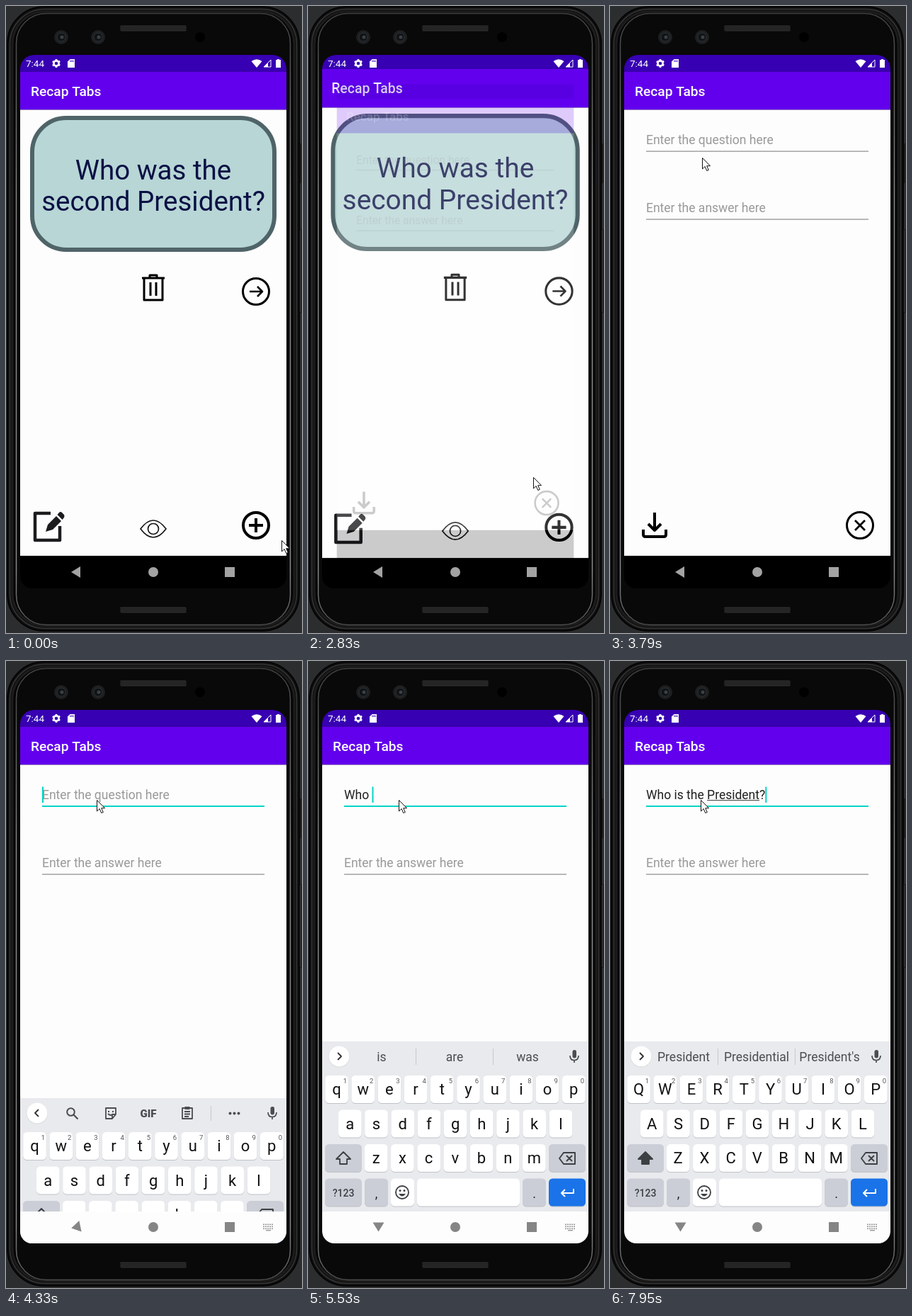
Recreate the animation shown at these times as an HTML page with a canvas. Size 418 px wide and 885 px high, loop 8 s.

```html
<!DOCTYPE html>
<html lang="en">
<head>
<meta charset="utf-8">
<title>Flash card app</title>
<style>
  html, body { margin: 0; width: 100%; height: 100%; overflow: hidden; background: #2c2d2f; }
  canvas { display: block; width: 418px; height: 885px; }
</style>
</head>
<body>
<canvas id="stage" width="418" height="885"></canvas>
<script>
const ctx = document.getElementById('stage').getContext('2d');
const LOOP = 8000;
const TITLE = 'Recap Tabs';
const PAPER = '#fdfdfd', TEAL = '#03d5c5', INK = '#000';

// Each list is held: an entry stays until the time of the next one.
const pointerSteps = [
  [0, 389, 754], [750, 387, 752], [870, 383, 748], [990, 378, 743], [1110, 373, 738],
  [1230, 369, 734], [1350, 366, 732], [1500, 362, 728], [1640, 358, 728], [1780, 357.5, 728],
  [2830, 318, 665], [2950, 275, 597], [3100, 236, 520], [3220, 198, 440], [3370, 171, 362],
  [3520, 154, 295], [3640, 137, 229], [3790, 130, 214], [3910, 129, 199], [4060, 128, 196]
];
// time, scale of leaving page, scale and opacity of entering page
const pageSteps = [
  [0, 1, 1, 0], [2830, 1.01, .89, .2], [2950, 1.03, .95, .66], [3100, 1.045, .99, 1], [3220, 1, 1, 1]
];
// time, keyboard offset, turn of the back arrow in degrees
const keyboardSteps = [[0, 300, 0], [4330, 80, -12], [4450, 0, -48], [4570, 0, -90]];
const typingSteps = [
  [0, '', ''],
  [4820, 'W', 'We|What|Who'],
  [5100, 'Wh', 'What|Who|When'],
  [5250, 'Who', 'Who|Whole|Whose'],
  [5530, 'Who ', 'is|are|was'],
  [5680, 'Who i', 'in|I|is'],
  [5800, 'Who is', 'is|isn\'t|issue'],
  [5940, 'Who is ', 'the|this|your'],
  [6080, 'Who is t', 'to|the|that'],
  [6200, 'Who is th', 'that|the|this'],
  [6320, 'Who is the', 'the|there|they'],
  [6440, 'Who is the ', 'second|first|President']
];
[...'President'].forEach((_, i) => {
  const time = 6690 + i * 120 + (i > 2 ? 30 : 0);
  const words = i < 1 ? 'second|first|President' : i < 3 ? 'Pro|President|Present'
    : 'President|Presidential|President\'s';
  typingSteps.push([time, 'Who is the ' + 'President'.slice(0, i + 1), words]);
});
typingSteps.push([7950, 'Who is the President?', 'President|Presidential|President\'s']);

const at = (steps, t) => steps.filter(step => step[0] <= t).pop();

function rect(x, y, w, h, color) {
  ctx.fillStyle = color;
  ctx.fillRect(x, y, w, h);
}
function rounded(x, y, w, h, r, fill, stroke, width = 1) {
  ctx.beginPath();
  ctx.roundRect(x, y, w, h, r);
  paint(fill, stroke, width);
}
function circle(x, y, r, fill, stroke, width = 1) {
  ctx.beginPath();
  ctx.arc(x, y, r, 0, Math.PI * 2);
  paint(fill, stroke, width);
}
function paint(fill, stroke, width) {
  if (fill) { ctx.fillStyle = fill; ctx.fill(); }
  if (stroke) { ctx.strokeStyle = stroke; ctx.lineWidth = width; ctx.stroke(); }
}
// SVG path drawn relative to a point
function shape(x, y, d, fill, stroke, width = 2) {
  const path = new Path2D(d);
  ctx.save();
  ctx.translate(x, y);
  ctx.lineJoin = 'round';
  if (fill) { ctx.fillStyle = fill; ctx.fill(path); }
  if (stroke) { ctx.strokeStyle = stroke; ctx.lineWidth = width; ctx.stroke(path); }
  ctx.restore();
}
function text(str, x, y, size, color, align = 'left', weight = 400) {
  ctx.font = `${weight} ${size}px Roboto, sans-serif`;
  ctx.textAlign = align;
  ctx.fillStyle = color;
  ctx.fillText(str, x, y);
  return ctx.measureText(str).width;
}

function drawSpeaker(y) {
  rounded(161, y, 94, 9, 2, '#1b1b1b');
  for (let row = 0; row < 4; row++)
    for (let x = 162 + row % 2; x < 254; x += 2) rect(x, y + 1 + row * 2, 1, 1, '#424242');
}
function drawPhone() {
  rect(0, 0, 418, 885, '#2c2d2f');
  rect(413, 194, 4, 56, '#1a1a1a');
  rect(413, 315, 4, 118, '#151515');
  rect(414, 316, 1.5, 116, '#777');
  rounded(2, 1, 412, 881, 52, '#101010', '#050505', 2);
  rounded(5.5, 4.5, 405, 874, 49, null, '#353535', 1.5);
  rounded(9, 8, 398, 867, 46, '#050505', '#1c1c1c', 3);
  const rim = ctx.createLinearGradient(0, 0, 0, 885);
  rim.addColorStop(0, '#3c3c3c');
  rim.addColorStop(.3, '#8a8a8a');
  rim.addColorStop(.9, '#8a8a8a');
  rim.addColorStop(1, '#444');
  rounded(14.5, 10.5, 387, 863, 42, '#090909', rim, 1.5);
  drawSpeaker(27);
  drawSpeaker(848);
  for (const x of [78, 130]) {
    circle(x, 44, 10, '#1d1f21');
    circle(x, 44, 6, '#101315', '#303336');
    circle(x + 1, 44, 2.5, '#3a4046');
  }
  circle(274, 44, 7, '#000');
}

function drawWindow() {
  rect(20, 69, 376, 23.5, '#3700b3');
  rect(20, 92.5, 376, 54, '#6200ee');
  rect(20, 146.5, 376, 629.5, PAPER);
  rect(20, 776, 376, 46, '#000');
  text(TITLE, 35, 126.5, 19.2, '#fff', 'left', 500);
}
function drawCardPage() {
  drawWindow();
  rounded(37, 158, 342, 186, 48, '#b7d6d5', '#4f6468', 6);
  text('Who was the', 208, 244.5, 38.5, '#0a1045', 'center');
  text('second President?', 208, 289, 38.5, '#0a1045', 'center');
  shape(208, 398, 'M-16-14H16M-5-14V-18H5V-14M-13-14V17H13V-14M-4-8V11M4-8V11', null, INK, 3);
  circle(353, 403, 18.5, null, INK, 3);
  shape(353, 403, 'M-9 0H8M2-7L9 0L2 7', null, INK, 2.6);
  shape(59, 735, 'M4-19H-18V19H17V-1', null, '#1c1c1e', 4.5);
  shape(59, 735, 'M-3 7L0-3L12-15L19-8L7 4ZM13.5-17L16-20Q18-22 20-20L23-17Q24-15 23-13L20.5-10Z', '#1c1c1e');
  shape(208, 738, 'M-18 0Q-9-12 0-12Q9-12 18 0Q9 12 0 12Q-9 12-18 0Z', null, '#151515', 1.7);
  circle(208, 738, 7.5, null, '#151515', 1.7);
  circle(353, 733, 18, null, INK, 4);
  shape(353, 733, 'M-10 0H10M0-10V10', null, INK, 4);
}
function drawField(y, hint, value, focused) {
  rect(51, y - (focused ? 1 : .5), 314, focused ? 2 : 1.2, focused ? TEAL : '#8c8c8c');
  if (!value) text(hint, 51, y - 10, 17.5, '#999');
  if (!focused) return;
  const width = text(value, 51, y - 10, 17.5, '#202020');
  // A lone capital in mid-sentence is not yet marked as being composed.
  const word = value.endsWith(' P') ? null : value.match(/[a-z]+(?=\??$)/i);
  if (word) {
    const start = ctx.measureText(value.slice(0, word.index)).width;
    rect(51 + start, y - 8.8, ctx.measureText(word[0]).width, 1, '#333');
  }
  rect(51 + width, y - 27.5, 2, 22.5, TEAL);
}
function drawEntryPage(value, focused) {
  drawWindow();
  drawField(205, 'Enter the question here', value, focused);
  drawField(301, 'Enter the answer here', '', false);
  shape(63, 733, 'M-16 6V13Q-16 16-13 16H13Q16 16 16 13V6M0-18V6M-9-2L0 7L9-2', null, INK, 4);
  circle(353, 733, 18.5, null, INK, 3);
  shape(353, 733, 'M-7-7L7 7M7-7L-7 7', null, INK, 2.8);
}

function drawKey(x, y, w, color = '#fff') {
  rounded(x, y + 1, w, 39, 5.5, '#bfc2c7');
  rounded(x, y, w, 39, 5.5, color);
}
function drawToolbar(words) {
  const gray = '#4a4d51';
  circle(44, 558.5, 15, '#d5d7da');
  circle(44, 558, 14.5, '#fff');
  shape(44, 558, words ? 'M-2-5L3 0L-2 5' : 'M2-5L-3 0L2 5', null, '#333', 1.8);
  rounded(373.5, 549, 5.5, 11.5, 2.7, gray);
  shape(376, 558, 'M-6-1Q-6 5.5 0 5.5Q6 5.5 6-1M0 5V9', null, gray, 1.7);
  if (words) {
    words.split('|').forEach((word, i) => text(word, 104 + i * 103, 565, 17.5, gray, 'center'));
    for (const x of [152, 261]) rect(x, 547, 1, 23, '#c5c7ca');
    return;
  }
  circle(91.5, 556.5, 5.3, null, gray, 2);
  shape(93, 558, 'M2.5 2.5L8.5 8.5', null, gray, 2.2);
  shape(148, 558, 'M-7-7H7V2L2 8H-7ZM7 2H2V8M-4 1Q0 5 3 1', null, gray, 1.8);
  rect(144, 555, 2, 2, gray);
  rect(150, 555, 2, 2, gray);
  text('GIF', 201, 563.5, 15, gray, 'center', 900);
  shape(256, 558, 'M-7-7H7V8H-7ZM-4-2H4M-4 1.5H4M-4 5H2', null, gray, 1.8);
  rect(252.5, 549, 7, 4, gray);
  rect(289, 548, 1, 21, '#c5c7ca');
  for (const x of [316.5, 322.5, 328.5]) circle(x, 558.5, 2, gray);
}
function drawKeyboard(words, caps) {
  const special = '#cbced6', dark = '#3c4043';
  rect(20, 537, 376, 240, '#e8eaed');
  drawToolbar(words);
  [['qwertyuiop', 40.5, 585], ['asdfghjkl', 59.3, 633.5], ['zxcvbnm', 96.2, 682]].forEach(([letters, x0, y], row) => {
    [...(caps ? letters.toUpperCase() : letters)].forEach((letter, i) => {
      const x = x0 + i * 37.2;
      drawKey(x - 16.3, y, 32.6);
      text(letter, x, y + 27.3, 22, '#111', 'center');
      if (!row) text((i + 1) % 10, x + 12, y + 11, 9.5, '#555', 'center');
    });
  });
  drawKey(24, 682, 52, special);
  shape(50, 702, 'M0-9L10 1H5V8H-5V1H-10Z', caps ? dark : null, dark, 1.8);
  drawKey(340, 682, 52, special);
  shape(366, 702, 'M-11 0L-5-8H11V8H-5ZM-1-4L7 4M7-4L-1 4', null, dark, 1.9);
  drawKey(24, 730.5, 52, special);
  text('?123', 50, 756, 14, dark, 'center', 500);
  drawKey(80, 730.5, 33, special);
  text(',', 96.5, 758, 18, '#222', 'center');
  drawKey(117, 730.5, 33);
  circle(133, 750, 9, null, dark, 1.8);
  circle(130, 747.5, 1.5, dark);
  circle(136, 747.5, 1.5, dark);
  shape(133, 751, 'M-5 1Q0 8 5 1Z', dark);
  drawKey(154, 730.5, 145);
  drawKey(303, 730.5, 33, special);
  text('.', 319.5, 758, 18, '#222', 'center');
  drawKey(340, 730.5, 52, '#1a73e8');
  shape(366, 750, 'M9-5V1H-8M-3-4L-8 1L-3 6', null, '#fff', 2);
}

function drawStatusIcons() {
  text('7:44', 28, 85.7, 13.5, '#fff');
  circle(71, 81, 3.6, null, '#fff', 2.6);
  for (let i = 0; i < 6; i++) {
    const c = Math.cos(i * Math.PI / 3 + .52), s = Math.sin(i * Math.PI / 3 + .52);
    shape(71, 81, `M${c * 4} ${s * 4}L${c * 6} ${s * 6}`, null, '#fff', 2.6);
  }
  shape(92, 81, 'M-1.5-6H5V6H-5V-2.5Z', '#fff');
  for (const x of [90.5, 92.5, 94.5]) rect(x, 76.5, 1, 2.5, '#3700b3');
  shape(354, 81, 'M0 6L-7.5-3Q0-8.5 7.5-3Z', '#fff');
  shape(369, 81, 'M5-5V5H-5Z', null, '#fff', 1);
  shape(369, 81, 'M1-1V5H-5Z', '#fff');
  shape(384.5, 81, 'M-1.5-6H1.5V-5H3.5V6H-3.5V-5H-1.5Z', '#fff');
}
function drawNavIcons(onWhite, turn) {
  const gray = onWhite ? '#858585' : '#a3a3a3';
  ctx.save();
  ctx.translate(99, 798.5);
  ctx.rotate(turn * Math.PI / 180);
  shape(0, 0, 'M-7 0.5L6-7.5V8.5Z', gray);
  ctx.restore();
  circle(208, 799, 7, gray);
  rect(309, 792, 14, 14, gray);
  if (!onWhite) return;
  for (let row = 0; row < 3; row++)
    for (let x = 363; x < 378; x += 3) rect(x, 794.5 + row * 3, 2, 1.6, '#999');
  rect(367, 803, 7, 1.4, '#999');
}
function drawPointer(x, y) {
  shape(x + .5, y + .5, 'M0 0V15.5L3.6 12L6.2 18L8.8 17L6.2 11.2H11Z', '#fff', '#111', 1);
}
function drawScaled(scale, alpha, page) {
  ctx.save();
  ctx.translate(208, 447);
  ctx.scale(scale, scale);
  ctx.translate(-208, -447);
  ctx.globalAlpha = alpha;
  page();
  ctx.restore();
}

function draw(t) {
  const [, leaving, entering, opacity] = at(pageSteps, t);
  const [, offset, turn] = at(keyboardSteps, t);
  const [, value, words] = at(typingSteps, t);
  const keyboardShown = offset < 300;
  drawPhone();
  ctx.save();
  ctx.beginPath();
  ctx.roundRect(20, 69, 376, 753, [20, 20, 17, 17]);
  ctx.clip();
  if (t < 3220) drawScaled(leaving, 1, drawCardPage);
  if (opacity) drawScaled(entering, opacity, () => drawEntryPage(value, t >= 4210));
  if (keyboardShown) {
    ctx.save();
    ctx.translate(0, offset);
    drawKeyboard(words, t >= 7950);
    ctx.restore();
    rect(20, 777, 376, 45, PAPER);
  }
  drawStatusIcons();
  drawNavIcons(keyboardShown, turn);
  ctx.restore();
  drawPointer(...at(pointerSteps, t).slice(1));
}

let start;
function tick(now) {
  start ??= now;
  draw((now - start) % LOOP);
  requestAnimationFrame(tick);
}
draw(0);
requestAnimationFrame(tick);
</script>
</body>
</html>
```
